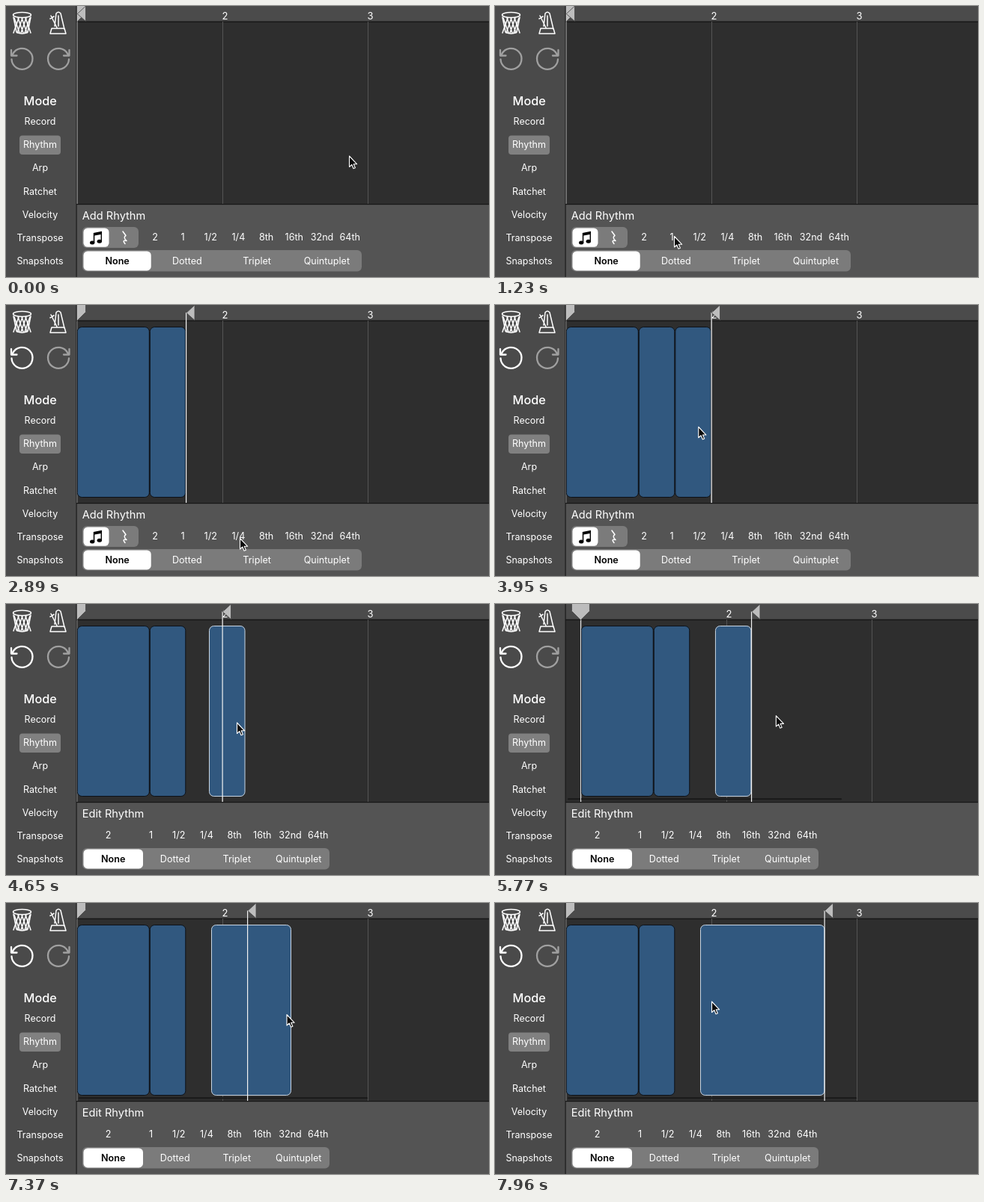
Recreate the animation shown at these times as an HTML page. Size 645x363 px, loop 8 s.

```html
<!DOCTYPE html>
<html lang="en">
<head>
<meta charset="utf-8">
<title>Rhythm editor</title>
<style>
html, body { margin: 0; width: 100%; height: 100%; overflow: hidden; background: #2e2e2e; }
svg { display: block; width: 645px; height: 363px; font: 12.6px Inter, "Open Sans", sans-serif; fill: none; }
text { fill: #fff; }
.mid { text-anchor: middle; }
.on { fill: #000; font-weight: 600; }
.line { stroke: #fff; stroke-width: 1.5; stroke-linecap: round; stroke-linejoin: round; }
.turn { stroke: #a0a0a0; stroke-width: 2.3; }
.marker { fill: #bdbdbd; stroke: #444; stroke-width: .8; }
</style>
</head>
<body>
<svg id="stage" viewBox="0 0 645 363"></svg>
<script>
const stage = document.getElementById("stage");
const LEFT = 95, BEAT = 48.5, BAR = 4 * BEAT;

function add(parent, tag, attrs, content) {
  const el = document.createElementNS("http://www.w3.org/2000/svg", tag);
  for (const k in attrs) el.setAttribute(k, attrs[k]);
  if (content) el.textContent = content;
  parent.appendChild(el);
  return el;
}
const group = (parent) => add(parent, "g", {});
const rect = (p, x, y, width, height, fill, rx = 0) =>
  add(p, "rect", { x, y, width, height, fill, rx });
const path = (p, d, attrs) => add(p, "path", { d, class: "line", ...attrs });
const label = (p, x, y, text, attrs) => add(p, "text", { x, y, class: "mid", ...attrs }, text);
const moveTo = (el, x, y = 0) => el.setAttribute("transform", `translate(${x} ${y})`);
const show = (el, on) => el.setAttribute("visibility", on ? "visible" : "hidden");

// Timeline
rect(stage, 94, 0, 551, 266, "#2e2e2e");
rect(stage, 94, 0, 551, 21, "#4b4b4b");
rect(stage, 94, 20.5, 551, 1.2, "#111");
const view = group(stage);
for (let bar = 1; bar < 4; bar++) {
  const x = Math.floor(LEFT + (bar - 1) * BAR);
  rect(view, x, 21, 1, 245, "#555");
  if (bar > 1) add(view, "text", { x: x - 0.5, y: 18, "font-size": 13 }, bar);
}
const scrollBar = rect(stage, 97, 260, 386, 2.4, "#1c1c1c", 1.2);

// Notes: time of entry and length in beats, laid end to end
const blocks = group(stage);
let end = LEFT;
const notes = [[1760, 2], [2890, 1], [3310, 1]].map(([at, beats]) => {
  const el = rect(blocks, end + 0.3, 29.5, beats * BEAT - 1, 228, "#31587f", 6);
  el.setAttribute("stroke", "#0c1118");
  end += beats * BEAT;
  return { at, el, end };
});
const held = notes[2].el;

const start = group(stage);
rect(start, 94, 21, 1, 245, "#eee");
add(start, "path", { d: "M82.5-1H106.5V9.5L94.5 21.5 82.5 9.5Z", class: "marker" });
const head = group(stage);
const headLine = rect(head, -0.5, 10, 1.2, 256, "#f2f2f2");
add(head, "path", { d: "M.3 10.5 11.5 0V20.5Z", class: "marker" });

// Bottom panel
rect(stage, 94, 265, 551, 98, "#545454");
rect(stage, 94, 265, 551, 1.2, "#161616");

function panel(title, width, whole, next) {
  const g = group(stage);
  add(g, "text", { x: 101.8, y: 286, "font-size": 14.6 }, title);
  ["2", "1", "1/2", "1/4", "8th", "16th", "32nd", "64th"].forEach((s, i) =>
    label(g, i ? next + 37.2 * (i - 1) : whole, 314, s));
  rect(g, 102, 327, width, 28.5, "#7b7b7b", 6);
  const cell = width / 4;
  rect(g, 103.5, 328.4, cell - 3, 26, "#fff", 5.5);
  ["None", "Dotted", "Triplet", "Quintuplet"].forEach((s, i) =>
    label(g, 102 + cell * (i + 0.5), 346, s, i ? {} : { class: "mid on" }));
  return g;
}
const addPanel = panel("Add Rhythm", 373, 199, 236);
const editPanel = panel("Edit Rhythm", 330, 136.5, 193.5);

rect(addPanel, 102, 296, 75, 28, "#7b7b7b", 6);
rect(addPanel, 103.5, 297.4, 34, 25.4, "#fff", 5.5);
add(addPanel, "ellipse", { cx: 115.2, cy: 317, rx: 3.2, ry: 2.5, fill: "#000" });
add(addPanel, "ellipse", { cx: 124.8, cy: 315.3, rx: 3.2, ry: 2.5, fill: "#000" });
add(addPanel, "path", { d: "M116.8 304 128 301.8V315.5H126.6V306L118.3 307.6V317H116.8Z", fill: "#000" });
path(addPanel, "M156 302 160 307.5Q156 310 161 314.5 154.5 313 159 318.5", { "stroke-width": 2.2 });

// Side panel
rect(stage, 0, 0, 94, 363, "#4a4a4a");
rect(stage, 93.5, 0, 1.2, 363, "#1a1a1a");
add(stage, "ellipse", { cx: 21.5, cy: 12, rx: 12, ry: 3.4, class: "line" });
path(stage, "M10 15 14 35Q21.5 39 29 35L33 15");
for (let i = 0; i < 4; i++) {
  const x = 11 + i * 5;
  path(stage, `M${x} 16 ${x + 7} 36M${43 - x} 16 ${36 - x} 36`, { "stroke-width": 1.2 });
}
path(stage, "M65 27 67 10Q70 6.500 73 10L78 31M70 13V27M61 30H78L80 37H59ZM60 13 68 29M59 17 64 14");

const turn = "M7.5 71.5A14 14 0 1 0 9 64.500M7 59V66.500H14.500";
const undo = path(stage, turn, { class: "line turn" });
path(stage, turn, { class: "line turn", transform: "translate(91.5 0) scale(-1 1)" });

label(stage, 45.7, 132.7, "Mode", { "font-size": 16.3, "font-weight": 500 });
rect(stage, 18, 173.5, 55, 25.5, "#808080", 4);
["Record", "Rhythm", "Arp", "Ratchet", "Velocity", "Transpose", "Snapshots"]
  .forEach((s, i) => label(stage, 45.5, 159.2 + i * 31.1, s, { "font-size": 12.5 }));

const cursor = add(stage, "path", {
  d: "M.5 0V14.5L3.8 11.5 6 16.8 8.4 15.8 6.2 10.8H10.7Z",
  fill: "#0a0a0a", stroke: "#fff", "stroke-width": 1.1, "stroke-linejoin": "round"
});

// Pointer moves: first and last step time, then where it ends
const moves = [
  [0, 0, 458, 201], [360, 1110, 239, 308.5], [1290, 1520, 271, 311],
  [2120, 2650, 312, 312.5], [3310, 3660, 266, 167], [3840, 4010, 276.5, 159.5],
  [4370, 4600, 308, 159], [5060, 5230, 320, 154], [5590, 5890, 394, 148],
  [6130, 6540, 316, 151], [7010, 7780, 433, 148], [7840, 7960, 289, 132]
];
const STEP = 58;

function pointer(t) {
  const i = moves.findLastIndex(m => t >= m[0]);
  const [from, to, x, y] = moves[i];
  if (i === 0) return [x, y];
  const n = Math.round((to - from) / STEP) + 1;
  const step = Math.floor((t - from) / (to - from) * (n - 1) + 1e-6) + 1;
  const p = Math.min(1, step / n);
  const ease = p * p * (3 - 2 * p);
  const [, , x0, y0] = moves[i - 1];
  return [x0 + (x - x0) * ease, y0 + (y - y0) * ease];
}

function draw(t) {
  const [x, y] = pointer(t);
  moveTo(cursor, x, y);

  const scroll = t >= 5590 && t < 7010 ? Math.max(0, (x - 320) * 0.364) : 0;
  [view, blocks, start].forEach(g => moveTo(g, scroll));
  show(scrollBar, t >= 5590);
  scrollBar.setAttribute("width", 386 - scroll);

  const editing = t >= 4370, dropped = t >= 4770;
  show(addPanel, !editing);
  show(editPanel, editing);
  undo.style.stroke = t >= notes[0].at ? "#fff" : "";
  notes.forEach(n => show(n.el, t >= n.at));

  // Drag moves the held note, then its right edge; the head follows on release
  const left = !editing ? 240.8 : dropped ? 274.5 : x - 36.5;
  const width = 47.5 + (t < 7010 ? 0 : t < 7780 ? x - 316 : 118);
  held.setAttribute("x", left);
  held.setAttribute("width", width);
  held.setAttribute("stroke", editing ? "#c9d6e4" : "#0c1118");

  const last = notes.findLast(n => t >= n.at);
  const headX = dropped ? left + (t < 7780 ? 48 : width) : last ? last.end : LEFT;
  moveTo(head, headX + scroll);
  headLine.setAttribute("opacity", last ? 1 : 0.3);
}

const began = performance.now();
function tick() {
  draw((performance.now() - began) % 8000);
  requestAnimationFrame(tick);
}
draw(0);
requestAnimationFrame(tick);
</script>
</body>
</html>
```
